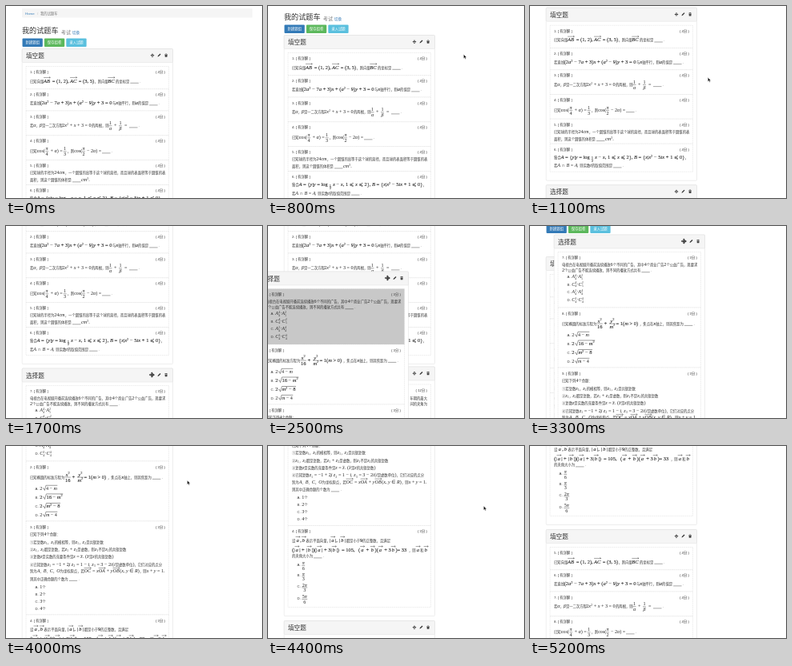
These frames come from a looping animation (320x240 px, 6.3 s). An HTML page:

```html
<!DOCTYPE html>
<html>
<head>
<meta charset="utf-8">
<style>
  html, body { margin: 0; width: 100%; height: 100%; overflow: hidden; background: #fff; }
  svg { display: block; width: 100%; height: 100%; }
</style>
</head>
<body>
<script>
const LOOP = 6300, STEP = 100;
const SANS = "'Liberation Sans', 'Noto Sans CJK SC', 'Noto Sans CJK', sans-serif";
const SERIF = "'Liberation Serif', 'DejaVu Sans', serif";
const INK = '#333', BODY = 4.33;
const pen = document.createElement('canvas').getContext('2d');

function el(parent, tag, attrs = {}) {
  const node = document.createElementNS('http://www.w3.org/2000/svg', tag);
  for (const k in attrs) node.setAttribute(k, attrs[k]);
  return parent.appendChild(node);
}
const move = (node, x, y, k = 1) => node.setAttribute('transform', `translate(${x} ${y}) scale(${k})`);
const rect = (g, x, y, width, height, fill, more) => el(g, 'rect', { x, y, width, height, fill, ...more });
const stroke = (g, d, w = 0.4) => el(g, 'path', { d, fill: 'none', stroke: '#222', 'stroke-width': w });

// Draws a run of text on its baseline and returns its width.
function put(g, x, y, str, size, family = SANS, fill = INK, style = 'normal') {
  if (str.trim()) {
    const node = el(g, 'text', { x, y, fill, 'font-size': size, 'font-family': family, 'font-style': style });
    if (family === SANS) node.setAttribute('stroke', 'none');
    node.textContent = str;
  }
  pen.font = `${style} 100px ${family}`;
  return pen.measureText(str).width * size / 100;
}

const TOKEN = /@([\d.]+);|#([vfhrob])(?:\{(.*?)\})?|_(.)\^(.)|([_^])(.)|(cos|log)|([A-Za-zα-ω]+)|([\u2460-\u24ff\u3000-\u9fff\uff00-\uffef]+)|(.)/g;

// Mixed Chinese and formula line: @x; jumps, #v vector, #f fraction, #h small fraction,
// #r root, #o overline, #b blank to fill in.
function flow(g, x, y, src, s) {
  for (const m of src.matchAll(TOKEN)) {
    const [, jump, cmd, arg, low, high, mark, script, fn, letters, han, other] = m;
    if (jump) x = +jump;
    else if (cmd) x += special(g, x, y, cmd, arg, s);
    else if (low) {
      put(g, x, y + s * 0.25, low, s * 0.65, SERIF);
      x += put(g, x, y - s * 0.38, high, s * 0.65, SERIF) + 0.2;
    } else if (mark) x += put(g, x, y + s * (mark === '_' ? 0.2 : -0.36), script, s * 0.68, SERIF) + 0.1;
    else if (letters) x += put(g, x, y, letters, s, SERIF, '#222', 'italic');
    else if (han) x += put(g, x, y, han, BODY);
    else x += put(g, x, y, fn || other, s, SERIF, '#222');
  }
  return x;
}

function special(g, x, y, cmd, arg, s) {
  if (cmd === 'b') {
    stroke(g, `M${x + 1} ${y + 0.7}h10.5`);
    put(g, x + 13, y, '.', BODY);
    return 15;
  }
  if (cmd === 'f' || cmd === 'h') {
    const k = cmd === 'h' ? s * 0.55 : s, drop = cmd === 'h' ? s * 0.3 : 0;
    const bar = y - k * 0.24 + drop;
    const parts = arg.split('/').map(p => {
      const node = el(g, 'g');
      return { node, w: flow(node, 0, 0, p, k) };
    });
    const w = Math.max(parts[0].w, parts[1].w) + 0.8;
    move(parts[0].node, x + (w - parts[0].w) / 2, bar - k * 0.22);
    move(parts[1].node, x + (w - parts[1].w) / 2, bar + k * 0.85);
    stroke(g, `M${x} ${bar}h${w}`);
    return w + 0.6;
  }
  if (cmd === 'v') {
    const letter = el(g, 'g'), inner = flow(letter, 0, y, arg, s);
    const w = Math.max(inner, 5.2);
    move(letter, x + (w - inner) / 2, 0);
    stroke(g, `M${x} ${y - s * 0.95}h${w + 0.4}m-1.4 -1l1.4 1l-1.4 1`);
    return w + 0.5;
  }
  const lead = cmd === 'r' ? s * 0.75 : 0;
  const end = flow(g, x + lead, y, arg, s), w = end - x;
  if (cmd === 'o') stroke(g, `M${x} ${y - s * 0.6}h${w}`, 0.35);
  else stroke(g, `M${x + 0.6} ${y - s * 0.25}l1 -.4l1.3 ${s * 0.45}L${x + lead} ${y - s * 0.88}H${end + 0.4}`, 0.45);
  return w + 0.5;
}

// A leading "!" makes the formula heavier.
function line(g, x, y, src) {
  const heavy = src[0] === '!';
  const box = el(g, 'g', heavy ? { stroke: '#222', 'stroke-width': 0.1 } : {});
  flow(box, x, y + 1.7, heavy ? src.slice(1) : src, heavy ? 6.5 : 6.1);
}

function crossIcon(g) {
  return el(g, 'path', { fill: '#333', d:
    'M0-2.7l1.1 1.3h-.7v1h1v-.7l1.3 1.1l-1.3 1.1v-.7h-1v1h.7l-1.1 1.3l-1.1-1.3h.7v-1h-1v.7l-1.3-1.1l1.3-1.1v.7h1v-1h-.7z' });
}
function icons(g) {
  move(crossIcon(g), 183, -0.8, 0.9);
  el(g, 'path', { fill: '#333', d: 'M189.5 1.1l.5-1.5l2.6-2.6l.9.9l-2.6 2.6z' });
  el(g, 'path', { fill: '#444', d: 'M198.2-2.5h1.2v-.6h1.4v.6h1.2v.6h-3.8zM198.5-1.5h3.2l-.3 2.7h-2.6z' });
}

// Panel whose origin is the centre of its heading; items hold [y, score, ...[x, y, text]].
function panel(page, title, height, items) {
  const g = el(page, 'g'), bottom = height - 26, frame = { stroke: '#ddd', 'stroke-width': 0.5 };
  rect(g, 20.2, -9, 188.3, height - 6, '#fff', { ...frame, rx: 1 });
  rect(g, 20.2, -9, 188.3, 17, '#f5f5f5', { ...frame, rx: 1 });
  put(g, 25, 2.7, title, 7.6);
  icons(g);
  const rows = items.map(([y, score, ...lines], i) => {
    const top = y - 7, end = i + 1 < items.length ? items[i + 1][0] - 7 : bottom;
    const box = rect(g, 25, top, 178.5, end - top, '#fff',
      { stroke: '#ccc', 'stroke-width': 0.4, 'stroke-dasharray': '1 .7' });
    const font = { y: y + 1.6, fill: INK, 'font-size': BODY, 'font-family': SANS };
    const label = el(g, 'text', { x: 30, ...font });
    el(g, 'text', { x: 199, 'text-anchor': 'end', ...font }).textContent = `( ${score}分 )`;
    lines.forEach(l => line(g, ...l));
    return { box, label };
  });
  const number = from => rows.forEach((r, i) => { r.label.textContent = `${from + i}. [ 有详解 ]`; });
  return { g, rows, number };
}

const svg = el(document.body, 'svg', { viewBox: '0 0 320 240' });
const page = el(svg, 'g');

rect(page, 20, 3, 288, 11.5, '#f5f5f5', { rx: 1 });
put(page, 24, 10.6, 'Home', BODY, SANS, '#337ab7');
put(page, 39, 10.6, '/', BODY, SANS, '#bbb');
put(page, 43, 10.6, '我的试题车', BODY, SANS, '#777');
put(page, 20, 34.4, '我的试题车', 9.1);
put(page, 69, 34.7, '考试', 5.9, SANS, '#777');
put(page, 83, 34.9, '切换', 4.4, SANS, '#337ab7');
[['新建题组', '#337ab7'], ['保存组卷', '#5cb85c'], ['录入试题', '#5bc0de']].forEach(([label, fill], i) => {
  const x = 20.5 + i * 27.4;
  rect(page, x, 40.5, 25.3, 10.5, fill, { rx: 1 });
  put(page, x + 3.9, 47.4, label, 4.4, SANS, '#fff');
});

const answers = panel(page, '解答题', 210, [
  [20, 12,
    [30, 30, '某函数的图象经过点P，且在区间上单调递增，求该函数在一个完整周@177.4;年期的最大'],
    [30, 37, '值与最小值，并求出当两个向量的长度相等时，这两个非零向量之@177.4;间的夹角为']]
]);

const blanks = panel(page, '填空题', 222, [
  [20, 4, [30, 31.4, '!已知向量@47;#v{AB}@57.7;= (1, 2),@80;#v{AC}@90.7;= (3, 5)@110.5;，则向量@127.3;#v{BC}@137;的坐标是#b']],
  [48.3, 4, [30, 59, '!若直线@42.7;(2a^2 − 7a + 3)x + (a^2 − 9)y + 3 = 0@133;与x轴平行，则a的值是#b']],
  [75.5, 4, [30, 87, '若α，β是一二次方程@70.3;2x^2 + x + 3 = 0@107;的两根，则@128.5;#f{1/α}@135;+@141;#f{1/β}@148;=@153;#b']],
  [106.3, 4, [30, 119, '已知cos(@49.2;#f{π/4}@54; + α) =@71.7;#f{1/3}@76.5;，则cos(@95;#f{π/2}@99.5; − 2α) =@119;#b']],
  [137, 4,
    [30, 146, '已知球的半径为@60.3;24cm@73.8;，一个圆锥的高等于这个球的直径，而且球的表面积等于圆锥的表'],
    [30, 155, '面积，则这个圆锥的体积是#b@94;cm^3.']],
  [168, 4,
    [30, 178, '!集合@38.5;A = {y|y = log@76.5;#h{1/2}@81;x − x, 1 ⩽ x ⩽ 2},@130;B = {x|x^2 − 5tx + 1 ⩽ 0}，'],
    [30, 188.3, '若A ∩ B = A@58;，则实数t的取值范围是#b']]
]);

const choices = panel(page, '选择题', 402, [
  [19.5, 3,
    [30, 28, '电视台在电视剧开播前连续播放6个不同的广告，其中4个商业广告2个公益广告，现要求'],
    [30, 35.3, '2个公益广告不能连续播放，则不同的播放方式共有#b']],
  [89, 3,
    [30, 102, '!已知椭圆的标准方程为@73.5;#f{x^2/16}@82.5;+@89;#f{y^2/m^2}@97.5;= 1(m > 0)@127;，焦点在x轴上，则其焦距为#b']],
  [164, 3,
    [30, 173.5, '已知下列4个命题：'],
    [30, 183, '①若复数z_1，z_2的模相等，则z_1，z_2是共轭复数'],
    [30, 192.5, '②z_1，z_2都是复数，若z_1 + z_2是虚数，则z_1不是z_2的共轭复数'],
    [30, 201.7, '③复数z是实数的充要条件是z = #o{z}. (#o{z}是z的共轭复数)'],
    [30, 211.2, '④已知复数z_1 = −1 + 2i@77.5;，z_2 = 1 − i@103;，z_3 = 3 − 2i@133;(i是虚数单位)，它们对应的点分'],
    [30, 219.7, '别为A、B、C，O为坐标原点，若@97.5;#v{OC} = x#v{OA} + y#v{OB}(x, y ∈ R)@167;，则x + y = 1.'],
    [30, 229, '则其中正确命题的个数为#b']],
  [281, 3,
    [30, 292.5, '!设@34.5;#v{a},#v{b}@47.5;表示平面向量，@77;|#v{a}|,@89;|#v{b}|@97.8;都是小于9的正整数，且满足'],
    [30, 304.5, '!(|#v{a}| + |#v{b}|)(|#v{a}| + 3|#v{b}|)@92;= 105,@113;(#v{a} + #v{b})(#v{a} + 3#v{b})@161.5;= 33@176;，则#v{a}和#v{b}'],
    [30, 312, '的夹角大小为#b']]
]);

// Answers A to D: heights, then formulas.
const OPTIONS = [
  [[43.5, 53, 62.7, 72.5], ['A_4^4·A_5^2', 'C_4^4·C_5^2', 'A_4^2·A_4^4', 'C_4^2·C_4^4']],
  [[116, 127, 138.5, 149], ['2#r{4 − m}', '!2#r{16 − m^2}', '!2#r{m^2 − 8}', '2#r{m − 4}']],
  [[239, 248, 257, 266], ['1个', '2个', '3个', '4个']],
  [[322.5, 336, 350, 364.5], ['#f{π/6}', '#f{π/3}', '#f{2π/3}', '#f{5π/6}']]
];
for (const [ys, texts] of OPTIONS) {
  ys.forEach((y, i) => {
    put(choices.g, 36.5, y + 1.6, 'ABCD'[i] + '.', BODY);
    line(choices.g, 42.3, texts[i].includes('#f') ? y + 1.2 : y, texts[i]);
  });
}

const arrow = el(svg, 'path', { d: 'M0 0v5.2l1.2-1.1l.9 1.9l.9-.4l-.9-1.8h1.7z', fill: '#111', stroke: '#fff', 'stroke-width': 0.4 });
const hand = crossIcon(svg);

// Key times in ms, then values, joined by straight lines.
const SCROLL = [[0, 0], [700, 0], [800, 17], [1500, 97], [2700, 97], [3300, 42], [3700, 42], [4400, 237], [4600, 288], [4700, 288], [5000, 351]];
const DRAG = [[2000, 0, 187], [2500, -33, 66], [2700, 23, 34], [2900, 25, 27], [3300, 10, 20]];
const MOUSE = [[200, 298, 88], [700, 244.5, 60.5], [900, 244.5, 60.5], [1500, 178, 147], [1700, 182, 186],
  [3700, 193, 19], [3800, 205, 27], [4400, 269.5, 75], [4700, 269.5, 75], [4800, 287, 90], [5000, 183, 112]];

function at(keys, t) {
  const n = keys.findIndex(k => k[0] > t);
  if (n < 0) return keys[keys.length - 1].slice(1);
  if (!n) return keys[0].slice(1);
  const a = keys[n - 1], b = keys[n], p = (t - a[0]) / (b[0] - a[0]);
  return a.slice(1).map((v, i) => v + (b[i + 1] - v) * p);
}

let shown = -1;
function draw(t) {
  const [scroll] = at(SCROLL, t);
  const dragging = t >= 2100 && t < 3500, dropped = t >= 3500;
  const gap = dragging && t >= 2800 ? 27 : 0;
  move(page, 0, -scroll);
  move(blanks.g, 0, dropped ? 464.5 : 62.5 + gap);
  move(answers.g, 0, dropped || !dragging ? 686 : 282 + gap);

  const [dx, dy] = at(DRAG, t);
  if (dragging) move(choices.g, dx, dy + scroll);
  else move(choices.g, 0, dropped ? 62.5 : 284);
  choices.rows[0].box.setAttribute('fill', t >= 2400 && t < 2700 ? '#c8c8c8' : '#fff');
  choices.number(dropped ? 1 : 7);
  blanks.number(dropped ? 5 : 1);
  answers.number(11);

  const holding = t >= 1700 && t < 3800;
  const [mx, my] = at(MOUSE, t);
  arrow.style.display = !holding && t >= 200 && t < 5000 ? '' : 'none';
  hand.style.display = holding ? '' : 'none';
  move(arrow, mx, my);
  move(hand, 182.3 + (dragging ? dx : 0), dragging ? dy - 1 : dropped ? 61 - scroll : 186, 1.3);
}

function tick() {
  const t = Math.floor(performance.now() % LOOP / STEP) * STEP;
  if (t !== shown) draw(shown = t);
  requestAnimationFrame(tick);
}
tick();
</script>
</body>
</html>
```
